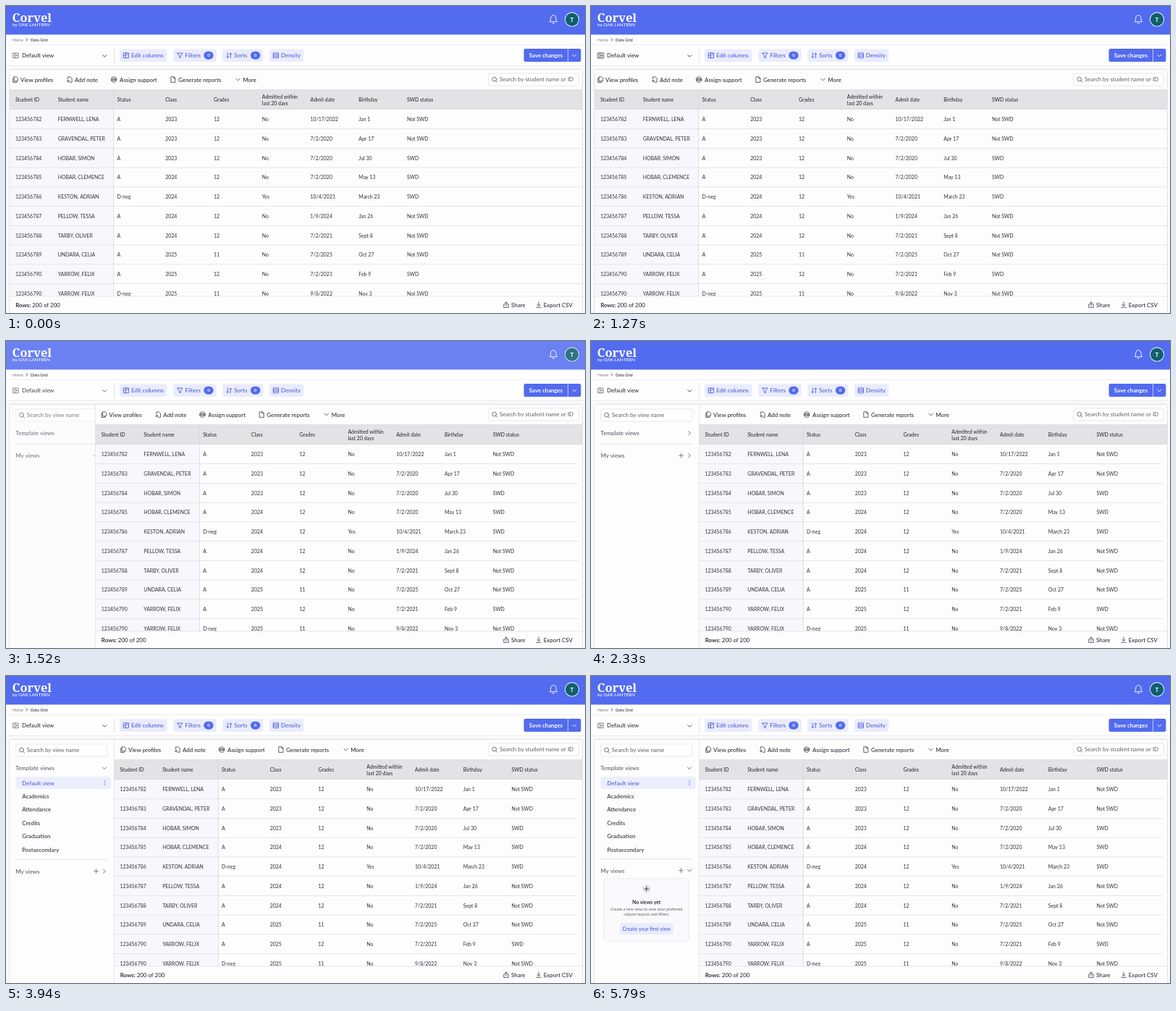
These frames come from a looping animation (800 by 424 pixels, 5970 ms). An HTML page with a canvas:

```html
<!DOCTYPE html>
<html lang="en">
<head>
<meta charset="utf-8">
<title>Data grid</title>
<style>
html, body { margin: 0; width: 100%; height: 100%; overflow: hidden; background: #fff; }
canvas { display: block; width: 800px; height: 424px; }
</style>
</head>
<body>
<canvas id="stage"></canvas>
<script>
const LOOP = 5970, W = 800, H = 424;
const INK = '#303039', MUTED = '#5c5c69', FAINT = '#777783', LINE = '#dfdfe5';
const BLUE = '#526bef', LINK = '#4c5fdd', TINT = '#eaecfd';

const canvas = document.getElementById('stage');
const ctx = canvas.getContext('2d');
const ratio = window.devicePixelRatio || 1;
canvas.width = W * ratio;
canvas.height = H * ratio;

const lerp = (a, b, p) => a + (b - a) * p;

// Ease-out, cubic-bezier(0, 0, 0.58, 1), solved by bisection
function easeOut(x) {
  if (x <= 0) return 0;
  if (x >= 1) return 1;
  let lo = 0, hi = 1;
  for (let i = 0; i < 20; i++) {
    const s = (lo + hi) / 2;
    if (1.74 * s * s - 0.74 * s * s * s < x) lo = s; else hi = s;
  }
  return 3 * lo * lo - 2 * lo * lo * lo;
}
const step = (t, start) => easeOut((t - start) / 300);
// Opacity of two layers halfway through a cross-dissolve
const dissolve = p => 1 - p * (1 - p);

function withAlpha(alpha, draw) {
  if (alpha <= 0) return;
  ctx.save();
  ctx.globalAlpha *= alpha;
  draw();
  ctx.restore();
}

function clipped(x, y, w, h, draw) {
  ctx.save();
  ctx.beginPath();
  ctx.rect(x, y, w, h);
  ctx.clip();
  draw();
  ctx.restore();
}

function text(str, x, y, { size = 7.9, color = INK, weight = 500, align = 'left', family = 'Lato, sans-serif' } = {}) {
  ctx.font = `${weight} ${size}px ${family}`;
  ctx.fillStyle = color;
  ctx.textAlign = align;
  ctx.fillText(str, x, y + size * 0.355);
}

function rect(x, y, w, h, fill) {
  ctx.fillStyle = fill;
  ctx.fillRect(x, y, w, h);
}

function box(x, y, w, h, r, fill, stroke) {
  ctx.beginPath();
  ctx.roundRect(x, y, w, h, r);
  if (fill) { ctx.fillStyle = fill; ctx.fill(); }
  if (stroke) { ctx.strokeStyle = stroke; ctx.lineWidth = 0.7; ctx.stroke(); }
}

function disc(x, y, r, fill) {
  ctx.beginPath();
  ctx.arc(x, y, r, 0, Math.PI * 2);
  ctx.fillStyle = fill;
  ctx.fill();
}

// Icon outlines, centred on the origin
const ICONS = {
  right: 'M-1.3-2.6L1.3 0L-1.3 2.6',
  down: 'M-2.6-1.3L0 1.3L2.6-1.3',
  plus: 'M-3 0H3M0-3V3',
  lens: 'M2.4-.5A2.9 2.9 0 1 1-3.4-.5A2.9 2.9 0 1 1 2.4-.5M1.6 1.6L3.7 3.7',
  panel: 'M-3.5-3.3H3.5V3.3H-3.5ZM-1.2-3.3V3.3M2 0H.4M1.2-1L.2 0L1.2 1',
  columns: 'M-3.4-3.4H3.4V3.4H-3.4ZM-.6-3.4V3.4M-3.4 0H-.6M1-1.4H3.4',
  funnel: 'M-3.7-3.3H3.7L1 .3V3.6L-1 2.5V.3Z',
  sort: 'M-2 -3.4V3.2M-3.6 1.6L-2 3.2L-.4 1.6M2 3.4V-3.2M.4-1.6L2-3.2L3.6-1.6',
  density: 'M-3.4-3.4H3.4V3.4H-3.4ZM-3.4-1.1H3.4M-3.4 1.1H3.4',
  profiles: 'M-1.6-3.8H1.6L3.3-2.1V2.2H-1.6ZM-1.8-1.8H-3.3V3.9H1.4V2.4',
  note: 'M-2.6-.8V-3.6H1.2L3.1-1.7V3.7H.2M-3.6 2H-.4M-2 .4V3.6',
  support: 'M3.7 0A3.7 3.7 0 1 1-3.7 0A3.7 3.7 0 1 1 3.7 0M1.5 0A1.5 1.5 0 1 1-1.5 0A1.5 1.5 0 1 1 1.5 0M-3.6-.9H-1.2M1.2-.9H3.6M-3.6 .9H-1.2M1.2 .9H3.6',
  report: 'M-2.8-3.8H.8L2.9-1.7V3.8H-2.8ZM.8-3.8V-1.7H2.9',
  share: 'M-1.6-.8H-3.2V3.7H3.2V-.8H1.6M0 1.4V-3.8M-1.7-2.2L0-3.8L1.7-2.2',
  save: 'M0-3.8V1.6M-2.2-.5L0 1.7L2.2-.5M-3.3 3.6H3.3',
  bell: 'M-5 3.2C-3.6 1.8-3.8 .2-3.7-1.4C-3.5-4-2-5.4 0-5.4C2-5.4 3.5-4 3.7-1.4C3.8 .2 3.6 1.8 5 3.2ZM-1.5 5A1.6 1.6 0 0 0 1.5 5'
};
for (const name in ICONS) ICONS[name] = new Path2D(ICONS[name]);

function icon(name, x, y, color = INK, width = 0.75) {
  ctx.save();
  ctx.translate(x, y);
  ctx.strokeStyle = color;
  ctx.lineWidth = width;
  ctx.lineCap = ctx.lineJoin = 'round';
  ctx.stroke(ICONS[name]);
  ctx.restore();
}

// Chevron that dissolves from pointing right to pointing down
function toggle(x, y, open) {
  withAlpha(1 - open, () => icon('right', x, y, MUTED, 0.85));
  withAlpha(open, () => icon('down', x, y, MUTED, 0.85));
}

function searchBox(x, y, w, label) {
  box(x, y, w, 17, 3, '#fff', LINE);
  icon('lens', x + 8.5, y + 8.6, MUTED, 0.85);
  text(label, x + 15.3, y + 8.7, { size: 7.85, color: MUTED, weight: 400 });
}

const COLUMNS = [
  ['Student ID', 8.5], ['Student name', 67.2], ['Status', 149], ['Class', 215.7], ['Grades', 282.4],
  ['Admitted within|last 20 days', 349.3], ['Admit date', 416], ['Birthday', 482.8], ['SWD status', 549.5]
];
const ROWS = [
  'FERNWELL, LENA|A|2023|12|No|10/17/2022|Jan 1|Not SWD',
  'GRAVENDAL, PETER|A|2023|12|No|7/2/2020|Apr 17|Not SWD',
  'HOBAR, SIMON|A|2023|12|No|7/2/2020|Jul 30|SWD',
  'HOBAR, CLEMENCE|A|2024|12|No|7/2/2020|May 13|SWD',
  'KESTON, ADRIAN|D-neg|2024|12|Yes|10/4/2021|March 23|SWD',
  'PELLOW, TESSA|A|2024|12|No|1/9/2024|Jan 26|Not SWD',
  'TARBY, OLIVER|A|2024|12|No|7/2/2021|Sept 8|Not SWD',
  'UNDARA, CELIA|A|2025|11|No|7/2/2025|Oct 27|Not SWD',
  'YARROW, FELIX|A|2025|12|No|7/2/2021|Feb 9|SWD',
  'YARROW, FELIX|D-neg|2025|11|No|9/8/2022|Nov 3|Not SWD'
].map((row, i) => [String(123456782 + Math.min(i, 8)), ...row.split('|')]);
const VIEWS = ['Default view', 'Academics', 'Attendance', 'Credits', 'Graduation', 'Postsecondary'];

function drawHeader(alpha) {
  withAlpha(alpha, () => rect(0, 0, W, 39.5, BLUE));
  text('Corvel', 8.5, 16.6, { size: 16.4, weight: 700, color: '#fff', family: '"Noto Serif", serif' });
  text('by OAK LANTERN', 9, 25.6, { size: 6.3, color: '#fff' });
  icon('bell', 756.3, 18.2, '#fff', 0.9);
  withAlpha(alpha, () => {
    disc(782, 18.6, 10, '#f4f8fa');
    disc(782, 18.6, 9.1, '#0f5f6e');
  });
  text('T', 782, 18.8, { size: 8, weight: 700, color: '#fff', align: 'center' });
}

function pill(x, w, name, label, badgeX) {
  box(x, 59.5, w, 17.5, 3, TINT);
  icon(name, x + 9, 68.3, LINK, 0.9);
  text(label, x + 16, 68.3, { size: 7.95, color: LINK });
  if (badgeX) {
    box(badgeX, 62.7, 13.4, 11, 5.5, BLUE);
    text('0', badgeX + 6.7, 68.3, { size: 6, weight: 700, color: '#fff', align: 'center' });
  }
}

function drawViewBar(hover, alpha) {
  text('Home', 9, 46.6, { size: 5.6, color: FAINT, weight: 400 });
  ctx.save();
  ctx.translate(29, 46.5);
  ctx.scale(0.65, 0.65);
  icon('right', 0, 0, INK, 1.3);
  ctx.restore();
  text('Data Grid', 34, 46.6, { size: 5.6 });
  rect(0, 53, W, 0.8, '#ececf1');
  rect(0, 82, W, 0.8, '#e6e6ec');
  rect(149, 57.5, 0.8, 22, LINE);

  withAlpha(hover, () => box(8, 63, 11, 11, 1.5, '#dfdfe6'));
  withAlpha(alpha, () => {
    icon('panel', 13.5, 68.4, MUTED);
    text('Default view', 22, 68.4);
    icon('down', 136.3, 69, INK, 0.85);
  });
  pill(157, 65.5, 'columns', 'Edit columns');
  pill(231.3, 59.5, 'funnel', 'Filters', 273.2);
  pill(299.3, 56, 'sort', 'Sorts', 337.9);
  pill(364, 47.3, 'density', 'Density');

  box(715.5, 59, 78.9, 18, 2.2, BLUE);
  text('Save changes', 746, 68.3, { size: 7.8, weight: 700, color: '#fff', align: 'center' });
  rect(776, 59, 0.8, 18, '#d5dbfb');
  icon('down', 785.3, 68.5, '#fff', 0.9);
}

function drawEmptyCard() {
  ctx.setLineDash([2, 1.6]);
  box(18, 279.7, 117.5, 86.3, 4, '#fafafc', '#d3d3dc');
  ctx.setLineDash([]);
  disc(76.7, 294, 6, '#e6e6eb');
  icon('plus', 76.7, 294, INK, 0.9);
  const centred = { align: 'center', size: 5.5, color: MUTED, weight: 400 };
  text('No views yet', 76.7, 313, { align: 'center', size: 6.8, weight: 700 });
  text('Create a new view to save your preferred', 76.7, 322.3, centred);
  text('column layouts and filters.', 76.7, 329, centred);
  box(39.7, 341.3, 74, 16, 3, TINT);
  text('Create your first view', 76.7, 349.5, { align: 'center', size: 7, color: LINK });
}

function drawSidebar(templates, mine) {
  searchBox(13.5, 94, 126.5, 'Search by view name');
  text('Template views', 13.3, 127.2, { color: MUTED });
  toggle(136, 127.3, templates);

  withAlpha(templates, () => {
    box(13.3, 139, 131.2, 17, 3, '#eceefd');
    VIEWS.forEach((label, i) => text(label, 22.3, 147.7 + 18.4 * i, { color: i ? INK : LINK }));
    for (const y of [144.8, 147.5, 150.2]) disc(136, y, 0.7, LINK);
  });

  const y = lerp(142, 253, templates) - mine;
  rect(10, y, 134, 25, '#fdfdfe');
  rect(13.3, y, 126.7, 0.8, LINE);
  const labelY = y + lerp(16.2, 16.7, templates);
  text('My views', 13.3, labelY, { color: MUTED });
  // The add button is anchored to the sliding edge of the sidebar
  icon('plus', 124.5, labelY, MUTED);
  toggle(136, labelY, mine);
  withAlpha(mine, drawEmptyCard);
}

function drawTable(open) {
  const left = lerp(4.5, 149, open);
  const shift = 149 * open;
  const lineEnd = lerp(796, 790, open);
  const cell = (str, x, y, weight) => text(str, left + x, y, { size: 6.95, weight });

  rect(left, 88, 796 - left, 336, '#fdfdfe');
  clipped(left, 87, 796 - left, 313.5, () => {
    for (const [name, iconX, label, x] of [
      ['profiles', 13, 'View profiles', 20], ['note', 88, 'Add note', 95],
      ['support', 149, 'Assign support', 157], ['report', 231, 'Generate reports', 238],
      ['down', 320.5, 'More', 327.3]
    ]) {
      icon(name, iconX + shift, 101.6);
      text(label, x + shift, 101.7);
    }
    searchBox(666.7, 93, 124.6, 'Search by student name or ID');

    rect(left, 142, 144, 260, '#f8f8fc');
    rect(left, 115, 800, 27.3, '#e3e3e6');
    rect(left, 142, 800, 0.8, '#d5d5db');
    for (const [title, x] of COLUMNS) {
      const lines = title.split('|');
      lines.forEach((line, i) => cell(line, x, lines.length > 1 ? 125.3 + 9 * i : 129.7, 500));
    }
    ROWS.forEach((row, i) => {
      const y = 156.8 + 26.72 * i;
      row.forEach((value, c) => cell(value, COLUMNS[c][1], y, 400));
      rect(left, y + 12.5, lineEnd - left, 0.8, LINE);
    });
    rect(left + 143.8, 115, 0.8, 290, '#d6d6dd');
  });

  rect(left, 400.5, 796 - left, 0.8, LINE);
  text('Rows:', left + 8.7, 412.9, { weight: 700 });
  text('200 of 200', left + 31.7, 412.9);
  icon('share', 691, 412.7);
  text('Share', 698, 412.9);
  icon('save', 736, 412.7);
  text('Export CSV', 742.8, 412.9);
  rect(left, 87, 0.7, 337, LINE);
}

function drawScene(t) {
  const hoverIn = step(t, 750), open = step(t, 1329);
  const templates = step(t, 3260), mine = step(t, 4910);
  const layer = dissolve(hoverIn) * dissolve(open);

  ctx.setTransform(ratio, 0, 0, ratio, 0, 0);
  rect(0, 0, W, H, '#fefeff');
  rect(0, 83, W, H - 83, '#fafafc');
  drawHeader(layer);
  drawViewBar(hoverIn * (1 - open), layer);
  box(4.5, 87.3, 791.8, 345, 3, '#fafafc', LINE);
  withAlpha(open, () => {
    rect(5, 88, 145, 336, '#fdfdfe');
    drawSidebar(templates, mine);
  });
  drawTable(open);
  rect(4.5, 87, 791.8, 0.8, LINE);
  rect(795.9, 89, 0.8, 335, LINE);
}

const begin = performance.now();
function frame() {
  drawScene((performance.now() - begin) % LOOP);
  requestAnimationFrame(frame);
}
frame();
</script>
</body>
</html>
```
